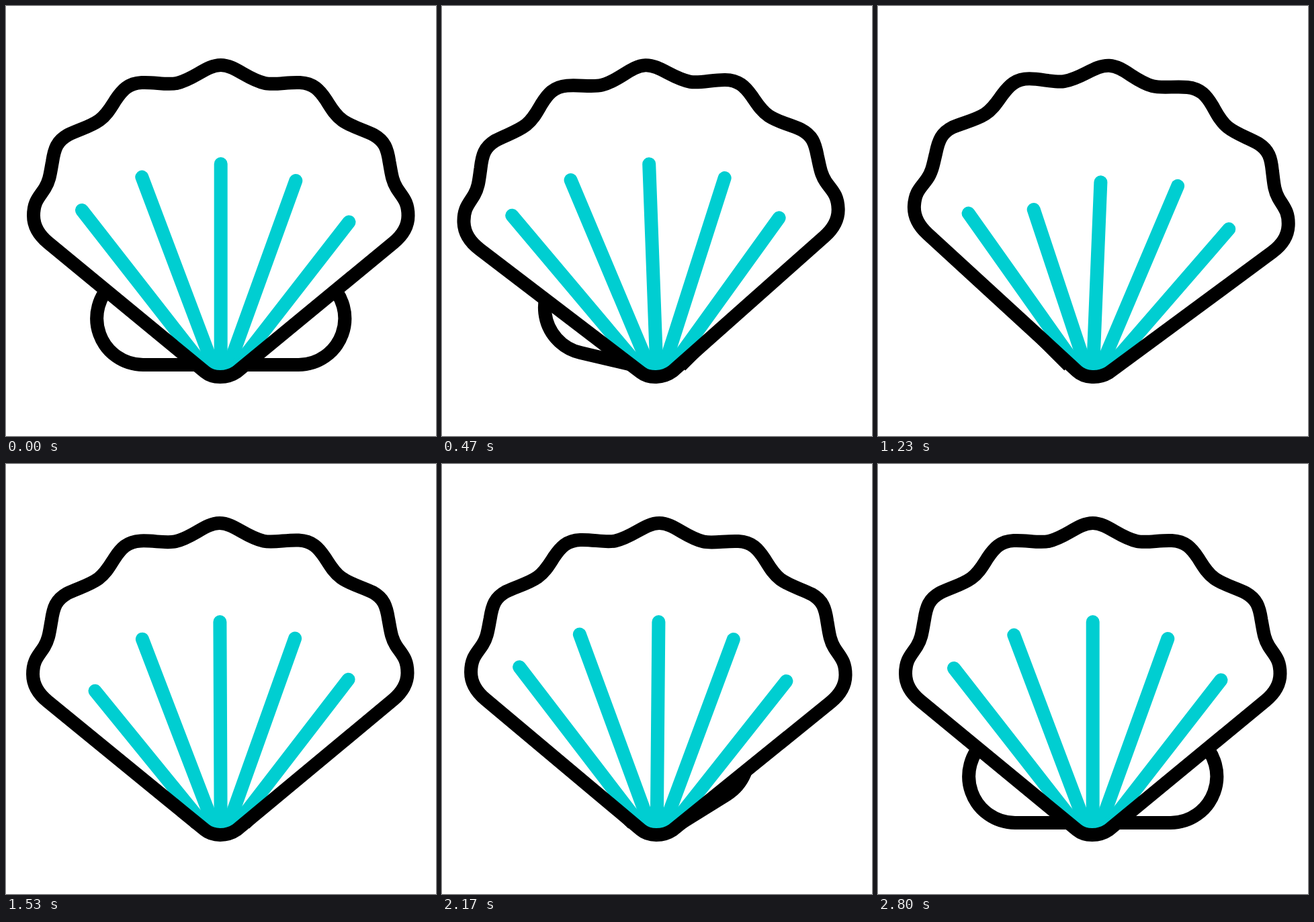
Write an HTML page that moves like this. It is 640 px wide and 640 px high and loops after 3000 ms.

```html
<!DOCTYPE html>
<html lang="en">
<head>
<meta charset="utf-8">
<title>Scallop shell</title>
<style>
  html, body { margin: 0; width: 100%; height: 100%; overflow: hidden; background: #fff; }
  svg { display: block; width: 100vw; height: 100vh; fill: none; stroke: #000; stroke-width: 20; }
  #rays { stroke: #00ced1; stroke-linecap: round; }
</style>
</head>
<body>
<svg viewBox="0 0 640 640">
  <defs>
    <path id="ear" d="M160 412A69 69 0 0 0 204 534H285"/>
    <path id="rim" d="M319.7 88
      C298 88 281 109 254 115 C240 118 220 113 202 114
      C182 115 173 125 163 140 C156 151 150 162 139 170
      C125 180 108 184 92 192 C76 201 72 212 69 232
      C66 248 65 260 58 271 C50 284 41 290 41 312
      C41 328 49 341 63 352.5 L296 544.5
      C308 554.5 329 554.5 343.5 544.5 L576.5 352.5
      C590.5 341 598.5 328 598.5 312 C598.5 290 589.5 284 581.5 271
      C574.5 260 573.5 248 570.5 232 C567.5 212 563.5 201 547.5 192
      C531.5 184 514.5 180 500.5 170 C489.500 162 483.5 151 476.5 140
      C466.5 125 457.5 115 437.5 114 C419.5 113 399.5 118 385.5 115
      C358.5 109 341 88 319.7 88Z"/>
  </defs>
  <use id="left" href="#ear"/>
  <g transform="translate(639.5 0) scale(-1 1)"><use id="right" href="#ear"/></g>
  <g id="shell">
    <use href="#rim" fill="#fff" stroke="none"/>
    <g id="rays"></g>
    <use href="#rim"/>
  </g>
</svg>
<script>
  const $ = id => document.getElementById(id);
  const LOOP = 3000;

  // Keys are [frame, value] pairs at 30 frames per second
  const swing = [[0, 0], [10, -7.4], [20, 7.6], [30, -5.4], [40, 5.4],
                 [50, -3.3], [60, 2.25], [70, -1.25], [80, 0]];
  const foldRight = [[0, 0], [14, 45], [60, 45], [74, 0]];
  const foldLeft = [[9, 0], [23, 45], [70, 45], [84, 0]];

  // The tips dip inwards in a wave that runs from right to left
  const rays = [
    { base: [299, 542], tip: [113, 304], dip: [26, 42], start: 33 },
    { base: [310, 540], tip: [202.3, 254.5], dip: [17, 55], start: 28 },
    { base: [319.7, 540], tip: [319.7, 235], dip: [-7, 54], start: 22 },
    { base: [330, 540], tip: [431.3, 260], dip: [-9, 51], start: 18 },
    { base: [339, 542], tip: [510.5, 321.5], dip: [-16, 27], start: 13 },
  ];

  for (const ray of rays) {
    ray.path = document.createElementNS("http://www.w3.org/2000/svg", "path");
    $("rays").append(ray.path);
  }

  const ease = p => p * p * (3 - 2 * p);

  function valueAt(keys, frame) {
    const next = keys.findIndex(([at]) => at > frame);
    if (next === 0) return keys[0][1];
    if (next < 0) return keys[keys.length - 1][1];
    const [t0, v0] = keys[next - 1], [t1, v1] = keys[next];
    return v0 + (v1 - v0) * ease((frame - t0) / (t1 - t0));
  }

  function turn(id, angle, x, y) {
    $(id).setAttribute("transform", `rotate(${angle} ${x} ${y})`);
  }

  function draw(frame) {
    turn("left", valueAt(foldLeft, frame), 283, 534);
    turn("right", valueAt(foldRight, frame), 283, 534);
    turn("shell", valueAt(swing, frame), 319, 546);
    for (const { base, tip, dip, start, path } of rays) {
      const k = valueAt([[start, 0], [start + 10, 1], [start + 20, 0]], frame);
      const end = tip.map((v, i) => v + dip[i] * k);
      path.setAttribute("d", `M${base}L${end}`);
    }
  }

  // Whole frames only, each starting on the nearest hundredth of a second
  function tick() {
    const hundredths = Math.floor(performance.now() % LOOP / 10);
    draw(Math.floor((hundredths + 0.5) * 0.3));
    requestAnimationFrame(tick);
  }
  tick();
</script>
</body>
</html>
```
